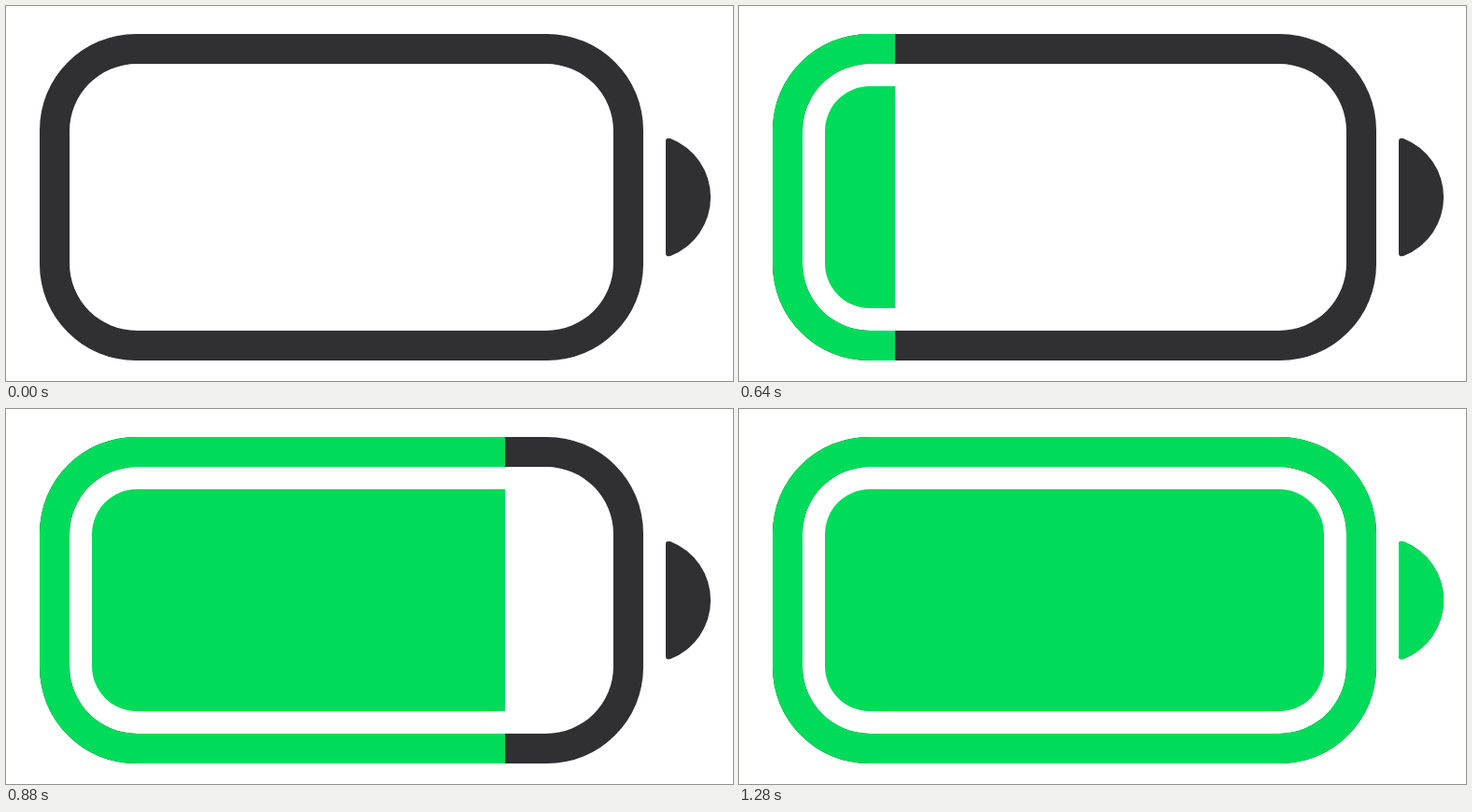
Write an HTML page that moves like this. It is 778 by 402 pixels and loops after 1.52 s.

```html
<!DOCTYPE html>
<html lang="en">
<head>
<meta charset="utf-8">
<title>Battery charging</title>
<style>
  html, body { margin: 0; width: 100%; height: 100%; overflow: hidden; background: #fff; }
  svg { display: block; width: 778px; height: 402px; }
</style>
</head>
<body>
<svg viewBox="0 0 778 402">
  <defs>
    <clipPath id="shell">
      <path clip-rule="evenodd" d="
        M139 30H579A103 103 0 0 1 682 133V277A103 103 0 0 1 579 380H139A103 103 0 0 1 36 277V133A103 103 0 0 1 139 30Z
        M140 62H578A72 72 0 0 1 650 134V276A72 72 0 0 1 578 348H140A72 72 0 0 1 68 276V134A72 72 0 0 1 140 62Z"/>
      <path d="M706 145Q706 140.5 711 142A67.6 67.6 0 0 1 711 268Q706 269.5 706 265Z"/>
    </clipPath>
    <clipPath id="core"><rect x="92" y="86" width="534" height="238" rx="48"/></clipPath>
  </defs>
  <g clip-path="url(#shell)">
    <rect width="778" height="402" fill="#303032"/>
    <rect class="charge" height="402" fill="#00dc5a"/>
  </g>
  <g clip-path="url(#core)">
    <rect class="charge" height="402" fill="#00dc5a"/>
  </g>
</svg>
<script>
  const LOOP = 1520;
  // [start in ms, x of the charge edge], each held until the next
  const STEPS = [
    [0, 0], [400, 71], [560, 107], [640, 167], [720, 267],
    [800, 391], [880, 534], [960, 662], [1040, 778]
  ];
  const charges = document.querySelectorAll('.charge');
  const start = performance.now();

  function edgeAt(time) {
    let edge = 0;
    for (const [at, x] of STEPS) if (time >= at) edge = x;
    return edge;
  }

  function draw(now) {
    const edge = edgeAt(Math.max(0, now - start) % LOOP);
    charges.forEach(c => c.setAttribute('width', edge));
    requestAnimationFrame(draw);
  }
  draw(start);
</script>
</body>
</html>
```
